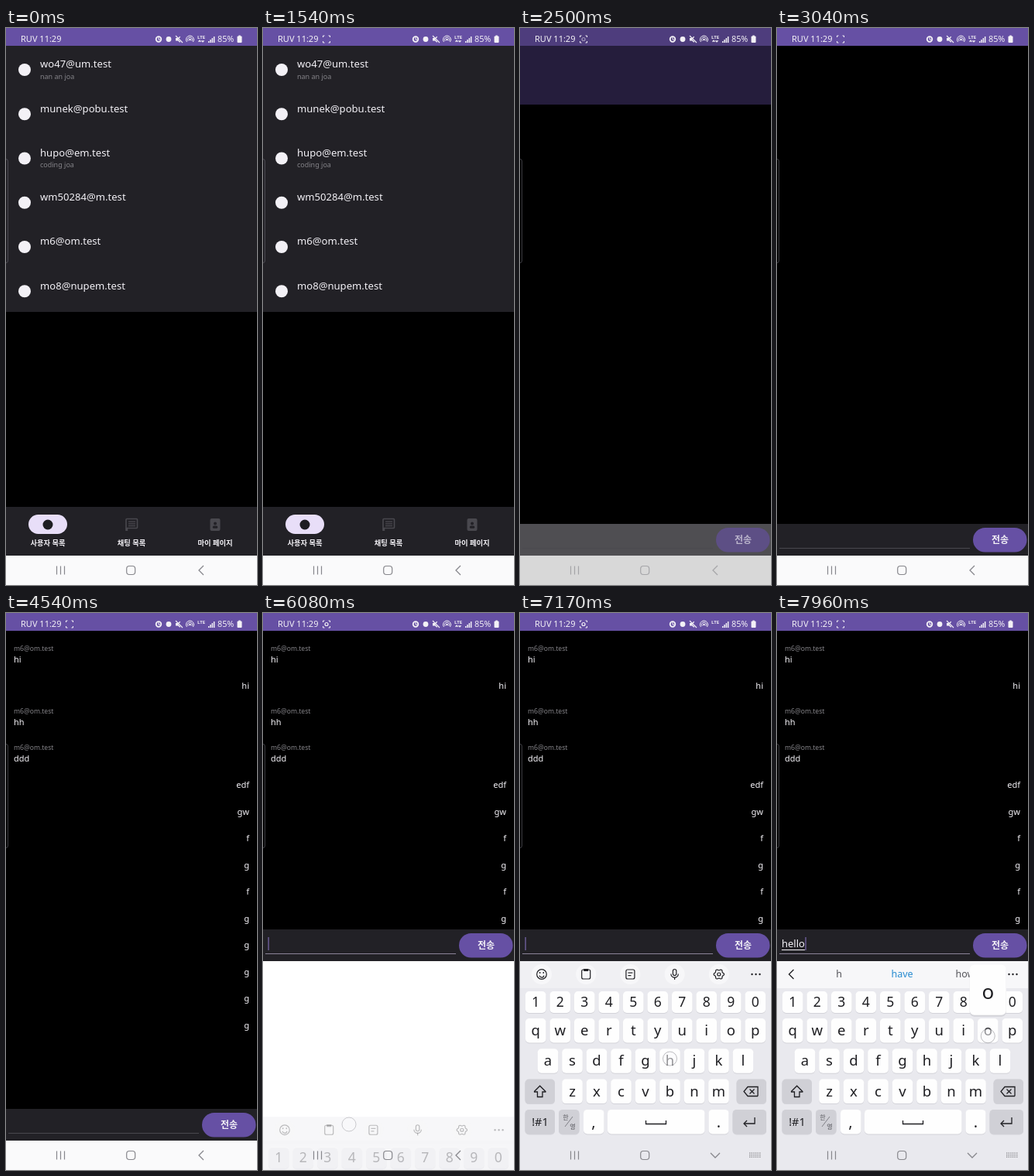
An HTML page with a canvas that plays this animation: 324x720 px, repeating every 8000 ms.

```html
<!DOCTYPE html>
<html lang="ko">
<head>
<meta charset="utf-8">
<title>Chat demo</title>
<style>
html, body { margin: 0; width: 100%; height: 100%; overflow: hidden; background: #000; }
canvas { display: block; width: 100vw; height: 100vh; }
</style>
</head>
<body>
<canvas id="stage"></canvas>
<script>
const W = 324, H = 720, LOOP = 8000;
const FONT = '"Noto Sans", "Noto Sans CJK KR", sans-serif';
const PURPLE = '#6650a4', SURFACE = '#222126', INK = '#f3f1f6', MUTED = '#858489', DIM = '#49484e';
const PALE = '#fafafb', KEY_INK = '#1e1e22', KEY = '#fefefe', SPECIAL = '#d0d0d6', SHADOW = '#d3d3d9';
const BAR = 41, NAV_Y = 682, KB_Y = 450, PITCH = 31.5;
const canvas = document.getElementById('stage');
const c = canvas.getContext('2d');

const users = [
  ['wo47@um.test', 'nan an joa'], ['munek@pobu.test'], ['hupo@em.test', 'coding joa'],
  ['wm50284@m.test'], ['m6@om.test'], ['mo8@nupem.test']
];
const peer = users[4][0];
// A leading "<" marks a received message.
const talk = '<hi hi <hh <ddd edf gw f g f g g g g g'.split(' ');
const keyRows = ['1234567890', 'qwertyuiop', 'asdfghjkl', 'zxcvbnm'];
const WORD = 'hello', TAP_START = 7130, TAP_STEP = 189, POP_DELAY = 45, POP_TIME = 110;

const clamp = v => Math.max(0, Math.min(1, v));
const span = (t, a, b) => clamp((t - a) / (b - a));
const repeat = (n, draw) => { for (let i = 0; i < n; i++) draw(i); };

function rect(x, y, w, h, color) {
  c.fillStyle = color;
  c.fillRect(x, y, w, h);
}
function round(x, y, w, h, r, color) {
  c.fillStyle = color;
  c.beginPath();
  c.roundRect(x, y, w, h, r);
  c.fill();
}
function outline(x, y, w, h, r, color, width = 1.2) {
  c.strokeStyle = color;
  c.lineWidth = width;
  c.beginPath();
  c.roundRect(x, y, w, h, r);
  c.stroke();
}
function disc(x, y, r, color) {
  c.fillStyle = color;
  c.beginPath();
  c.arc(x, y, r, 0, 7);
  c.fill();
}
function ring(x, y, r, color, width = 1.2, from = 0, to = 7) {
  c.strokeStyle = color;
  c.lineWidth = width;
  c.beginPath();
  c.arc(x, y, r, from, to);
  c.stroke();
}
function line(color, width, ...xy) {
  c.strokeStyle = color;
  c.lineWidth = width;
  c.beginPath();
  for (let i = 0; i < xy.length; i += 2) c.lineTo(xy[i], xy[i + 1]);
  c.stroke();
}
// An open arrow head around (x, y), turned by quarter turns from "left".
function chevron(x, y, size, color, turns = 0) {
  c.save();
  c.translate(x, y);
  c.rotate(turns * Math.PI / 2);
  line(color, 1.3, size / 2, -size, -size / 2, 0, size / 2, size);
  c.restore();
}
// y is the middle of the lowercase letters.
function text(s, x, y, size, color, align = 'left', weight = 400) {
  c.font = `${weight} ${size}px ${FONT}`;
  c.fillStyle = color;
  c.textAlign = align;
  c.textBaseline = 'alphabetic';
  c.fillText(s, x, y + size * 0.34);
}
function layer(alpha, draw, dy = 0) {
  c.save();
  c.globalAlpha *= alpha;
  c.translate(0, dy);
  draw();
  c.restore();
}

function recordIcon(t) {
  if (t < 40) return;
  const x = 82, y = 14.5, k = t % 1000;
  for (const sx of [-1, 1]) for (const sy of [-1, 1])
    line(INK, 1, x + sx * 2.5, y + sy * 4.5, x + sx * 4.5, y + sy * 4.5, x + sx * 4.5, y + sy * 2.5);
  if (k > 60 || t < 100) layer(1 - span(k, 460, 540), () => ring(x, y, 2, INK));
}

function statusBar(t) {
  text('RUV 11:29', 19, 14, 11, INK);
  recordIcon(t);
  // alarm, plain dot, muted speaker, hotspot
  ring(197, 14.5, 3.3, INK, 1.8);
  line(INK, 1, 197, 12, 197, 15, 199, 15);
  disc(210, 14.5, 3.4, INK);
  rect(219, 13, 3, 3.5, INK);
  chevron(223, 14.7, 3.5, INK);
  line(INK, 1.1, 219, 10, 228, 19);
  disc(237.5, 15, 1.3, INK);
  for (const r of [3, 5]) ring(237.5, 15, r, INK, 1, 2.5, 6.93);
  text('LTE', 252, 12, 6, INK, 'center', 700);
  // data arrows come and go
  if (t < 4230 || (t > 5230 && t < 6230)) {
    chevron(250, 17, 1.5, INK, 1);
    chevron(254, 17, 1.5, INK, 3);
  }
  repeat(4, i => rect(261 + i * 2.3, 17 - i * 2, 1.5, 2 + i * 2, INK));
  text('85%', 273, 14, 10.8, INK);
  round(298.5, 10.5, 6, 8.5, 1, INK);
  rect(300.3, 9.5, 2.4, 1.5, INK);
}

function sysIcons(color = '#87878c', keyboardOpen = false) {
  const y = 701;
  for (const x of [65.5, 70.5, 75.5]) line(color, 1.2, x, y - 5.5, x, y + 5.5);
  outline(155.7, y - 5.5, 11, 11, 3.5, color);
  chevron(252, y, 6, color, keyboardOpen ? 3 : 0);
  if (keyboardOpen) repeat(18, i => rect(296 + i % 6 * 2.6, y - 3.5 + Math.floor(i / 6) * 2.5, 1.4, 1.3, color));
}

function tabs() {
  const y = 642;
  rect(0, 619, W, 63, SURFACE);
  round(29, 629, 50, 25, 12.5, '#e8def8');
  disc(54, y, 6.5, KEY_INK);
  outline(155, y - 7.5, 14.5, 12, 1, DIM, 1.6);
  rect(154.2, y + 4, 3, 4, DIM);
  repeat(3, i => rect(158, y - 4.5 + i * 2.7, 9, 1.3, DIM));
  round(263.5, y - 8, 13, 16, 2, DIM);
  disc(270, y - 1.5, 2, SURFACE);
  round(266.8, y + 1.5, 6.4, 3.2, 1.5, SURFACE);
  ['사용자 목록', '채팅 목록', '마이 페이지'].forEach((name, i) =>
    text(name, 54 + i * 108, 666, 9.3, INK, 'center', 700));
}

function userList() {
  rect(0, 23, W, 344, SURFACE);
  rect(0, 0, W, 23, PURPLE);
  users.forEach(([name, note], i) => {
    const y = 47 + i * 57.25;
    disc(24, y + 7, 8, INK);
    text(name, 44, y, 13.1, INK);
    if (note) text(note, 44, y + 15.5, 9, MUTED);
  });
  tabs();
  rect(0, NAV_Y, W, H - NAV_Y, PALE);
}

// The list lifts while an empty window with a title bar fades in above it.
function leaveList(t) {
  const p = span(t, 2130, 2500);
  layer(1, userList, -15 * p);
  layer(1 - Math.pow(1 - p, 1.8), () => {
    rect(0, 0, W, H, '#000');
    rect(0, 0, W, 99, PURPLE);
  });
  sysIcons(p > 0.3 ? '#34343c' : undefined);
}

function inputBar(y, t, open) {
  rect(0, y, W, BAR, SURFACE);
  line(open ? '#8b8398' : DIM, 1.2, 3, y + 31.5, 249, y + 31.5);
  round(253, y + 5, 69.5, 31.5, 15.8, PURPLE);
  text('전송', 288, y + 20.5, 12, INK, 'center', 700);
  if (!open) return;
  const typed = WORD.slice(0, Math.max(0, Math.floor((t - TAP_START - POP_DELAY) / TAP_STEP) + 1));
  text(typed, 6, y + 19, 13, INK);
  const w = c.measureText(typed).width;
  rect(6, y + 26, w, 1, INK);
  if (typed || (t - 6040) % 1000 < 500) rect(6.5 + w, y + 10, 1.2, 17, '#7a68ae');
}

function messages() {
  let y = 46;
  for (const item of talk) {
    if (item[0] === '<') {
      text(peer, 10, y, 8.6, MUTED);
      text(item.slice(1), 10, y + 14, 11, INK);
      y += 47;
    } else {
      text(item, 314, y + 1, 11, INK, 'right');
      y += 34.5;
    }
  }
}

const rowTop = i => i ? 484.7 + i * 39.3 : 489;
const rowHeight = i => i ? 31.5 : 28;
const keyX = (keys, i) => W / 2 + (i - (keys.length - 1) / 2) * PITCH;

function key(x, row, w, color = KEY) {
  const y = rowTop(row), h = rowHeight(row);
  round(x, y + 1, w, h, 5, SHADOW);
  round(x, y, w, h, 5, color);
}

function tools() {
  const y = 467, k = KEY_INK, at = i => 28 + i * 57.2;
  repeat(5, i => disc(at(i), y, 13, '#f7f7f9'));
  ring(at(0), y, 6.3, k);
  ring(at(0), y + 1, 3, k, 1.2, 0.2, 2.94);
  for (const s of [-1, 1]) disc(at(0) + s * 2.3, y - 2, 0.9, k);
  for (const i of [1, 2]) outline(at(i) - 5.5, y - 6, 11, 12, 2, k);
  rect(at(1) - 3, y - 7, 6, 3, k);
  repeat(2, i => rect(at(2) - 3, y - 2.5 + i * 3.5, 6 - i * 2, 1.2, k));
  outline(at(3) - 2.2, y - 6.5, 4.4, 8, 2.2, k);
  ring(at(3), y - 0.5, 4.7, k, 1.2, 0, Math.PI);
  line(k, 1.2, at(3), y + 4, at(3), y + 7);
  const gear = [];
  repeat(50, i => {
    const a = i * Math.PI / 24, r = 5.9 + 0.8 * Math.cos(a * 6);
    gear.push(at(4) + r * Math.cos(a), y + r * Math.sin(a));
  });
  line(k, 1.2, ...gear);
  ring(at(4), y, 2, k);
}

function suggestions() {
  rect(0, KB_Y, W, 35, '#f7f7f9');
  chevron(18.5, 467, 6, KEY_INK);
  ['h', 'have', 'how'].forEach((word, i) =>
    text(word, 80 + i * 81.5, 467, 12.5, i === 1 ? '#278bd0' : '#55555b', 'center'));
}

function specialKeys() {
  const k = KEY_INK, y3 = 618.5, y4 = 658;
  for (const row of [3, 4]) for (const x of [6.5, 279.5]) {
    const grow = row === 4 && x > 9 ? 5 : 0;
    key(x - grow, row, 38.5 + grow, SPECIAL);
  }
  key(50, 4, 26.5, SPECIAL);
  key(82, 4, 26.5);
  key(113, 4, 125.5);
  key(243.5, 4, 26);
  // shift
  chevron(25.7, y3 - 3.5, 7.5, k, 1);
  line(k, 1.3, 18, y3 + 0.5, 22.5, y3 + 0.5, 22.5, y3 + 7, 29, y3 + 7, 29, y3 + 0.5, 33.5, y3 + 0.5);
  // backspace
  line(k, 1.3, 307, y3 + 6, 294, y3 + 6, 289, y3, 294, y3 - 6, 307, y3 - 6, 307, y3 + 6);
  for (const s of [-3, 3]) line(k, 1.3, 296.5, y3 - s, 302.5, y3 + s);
  text('!#1', 26, y4, 14.5, k, 'center', 500);
  text('한', 59, y4 - 6, 8, '#55555b', 'center');
  text('영', 68, y4 + 6, 8, '#55555b', 'center');
  line('#77777d', 0.9, 58, y4 + 6, 68, y4 - 7);
  text(',', 95, y4, 20, k, 'center', 500);
  text('.', 256.5, y4, 20, k, 'center', 500);
  line(k, 1.3, 162.5, y4 - 2, 162.5, y4 + 2.5, 188.5, y4 + 2.5, 188.5, y4 - 2);
  // enter
  line(k, 1.3, 303, y4 - 6, 303, y4 + 2, 289, y4 + 2);
  chevron(291, y4 + 2, 4, k);
}

function keyboard(t) {
  rect(0, KB_Y, W, H - KB_Y, '#e9e9ee');
  rect(0, KB_Y, W, 35, '#f0f0f3');
  t > TAP_START + 110 ? suggestions() : tools();
  repeat(3, i => disc(299.5 + i * 5, 467, 1.2, KEY_INK));
  keyRows.forEach((keys, row) => [...keys].forEach((ch, i) => {
    const x = keyX(keys, i);
    key(x - 13.3, row, 26.6);
    text(ch, x, rowTop(row) + rowHeight(row) / 2, row ? 18.5 : 17.5, KEY_INK, 'center');
  }));
  specialKeys();
}

function touch(x, y, alpha) {
  layer(alpha, () => {
    disc(x, y, 9, 'rgba(250,250,252,.55)');
    ring(x, y, 9, 'rgba(145,145,150,.6)', 1);
  });
}

function keyTaps(t) {
  [...WORD].forEach((ch, i) => {
    const k = t - TAP_START - i * TAP_STEP;
    if (k < 0 || k > 190) return;
    const row = keyRows.findIndex(keys => keys.includes(ch));
    const x = keyX(keyRows[row], keyRows[row].indexOf(ch));
    const y = rowTop(row) + rowHeight(row) / 2;
    if (k >= POP_DELAY && k < POP_DELAY + POP_TIME) {
      const left = Math.min(x - 23.5, W - 50);
      round(left, y - 83, 47, 65, 6, SHADOW);
      round(left, y - 85, 47, 65, 6, KEY);
      text(ch, left + 23.5, y - 50, 26, KEY_INK, 'center');
    }
    touch(x, y + (row === 1 ? 7 : -3), clamp(k / 30) * (1 - span(k, 130, 190)));
  });
}

function chat(t) {
  const open = t >= 6040;
  const barY = (open ? KB_Y : NAV_Y) - BAR;
  rect(0, 0, W, H, '#000');
  rect(0, 0, W, 23, PURPLE);
  layer(span(t, 3050, 3210), messages);
  rect(0, barY, W, H - barY, open ? '#fff' : PALE);
  rect(0, NAV_Y, W, H - NAV_Y, PALE);
  inputBar(barY, t, open);
  if (open) {
    const p = span(t, 6040, 6340);
    layer(clamp(p * 2), () => keyboard(t), (H - KB_Y) * (1 - p) ** 2);
  }
  sysIcons(undefined, t > 6240);
  keyTaps(t);
  if (t > 5830) touch(111, 661, span(t, 5830, 5870) * (1 - span(t, 6060, 6140)));
}

function draw(t) {
  rect(0, 0, W, H, '#000');
  if (t < 2560) leaveList(t);
  if (t > 2400) layer(span(t, 2400, 2560), () => chat(t));
  outline(-4, 169.5, 6.5, 134, 2.5, 'rgba(112,112,120,.55)', 1);
  statusBar(t);
}

function frame() {
  const dpr = window.devicePixelRatio || 1;
  const w = Math.round(innerWidth * dpr), h = Math.round(innerHeight * dpr);
  if (canvas.width !== w || canvas.height !== h) {
    canvas.width = w;
    canvas.height = h;
  }
  c.setTransform(w / W, 0, 0, h / H, 0, 0);
  draw(performance.now() % LOOP);
  requestAnimationFrame(frame);
}
frame();
</script>
</body>
</html>
```
